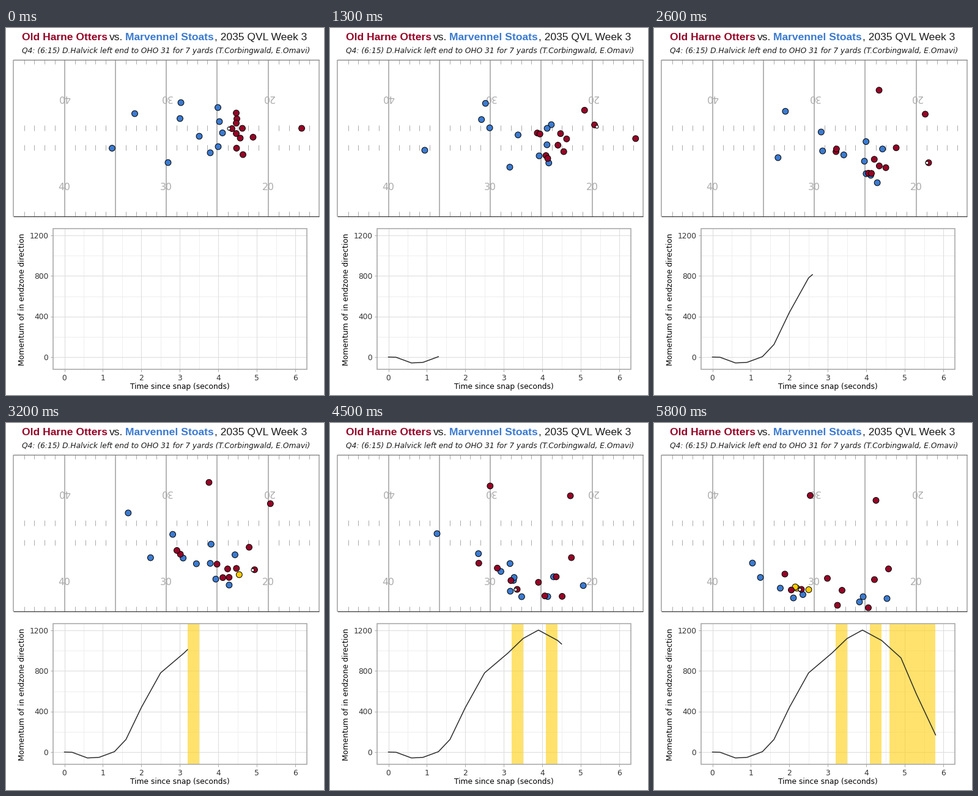
Write a matplotlib script that moves like this. It is 520x600 px and loops after 6.3 s.

```python
import matplotlib.pyplot as plt
import numpy as np
from matplotlib.animation import FuncAnimation
from matplotlib.patches import Rectangle

W, H, DPI = 520, 600, 100
PX = 72 / DPI  # points per pixel
STEP, FRAMES, LAST = 100, 63, 58
T = np.minimum(np.arange(FRAMES), LAST) / 10

RED, BLUE, GOLD = "#960427", "#3b7bd1", "#ffcc00"
LINE, DARK, INK = "#aaaaaa", "#333333", "#1a1a1a"
SANS, HEAD = "DejaVu Sans", "Liberation Sans"

fig = plt.figure(figsize=(W / DPI, H / DPI), dpi=DPI, facecolor="white")
ax = fig.add_axes([0, 0, 1, 1])
ax.set_xlim(0, W)
ax.set_ylim(H, 0)
ax.axis("off")


def label(x, y, text, size, color="black", ha="center", va="baseline",
          family=SANS, **kw):
    return ax.text(x, y, text, fontsize=size * PX, color=color,
                   ha=ha, va=va, family=family, **kw)


def vlines(xs, y0, y1, color, width):
    ax.vlines(xs, y0, y1, color=color, lw=width * PX, zorder=1)


def hlines(ys, x0, x1, color, width):
    ax.hlines(ys, x0, x1, color=color, lw=width * PX, zorder=1)


# ---- headings ----
x = 26
for text, color, weight, gap in (
    ("Old Harne Otters", RED, "bold", 3),
    ("vs.", INK, "normal", 4),
    ("Marvennel Stoats", BLUE, "bold", 1),
    (", 2035 QVL Week 3", INK, "normal", 0),
):
    part = label(x, 20, text, 17.5, color, ha="left", family=HEAD, weight=weight)
    x = part.get_window_extent().x1 + gap

label(262, 41,
      "Q4: (6:15) D.Halvick left end to OHO 31 for 7 yards (T.Corbingwald, E.Omavi)",
      12.2, INK, style="italic")

# ---- field ----
TOP, BOTTOM, LEFT, RIGHT = 51.5, 307.5, 12, 512
YARD = 16.65
five = 95.5 + 5 * YARD * np.arange(-1, 6)
ticks = (five[:-1, None] + YARD * np.arange(1, 5) + 0.7).ravel()
vlines(five, TOP, BOTTOM, LINE, 1.7)
for y0, y1 in ((TOP, 59), (159, 167.5), (191, 199.5), (300, BOTTOM)):
    vlines(ticks, y0, y1, LINE, 1)
hlines(TOP, LEFT, RIGHT, "#777777", 1.2)
hlines(BOTTOM, LEFT, RIGHT, DARK, 1.2)
for x, number in zip(five[1::2], ("40", "30", "20")):
    label(x, 115, number, 15.7, LINE, va="center", rotation=180)
    label(x, 260.5, number, 15.7, LINE, va="center")

# ---- chart ----
X0, X1, Y0, Y1 = 76.5, 492, 328, 558


def sec(t):
    return 95.5 + 62.92 * np.asarray(t)


def mom(v):
    return 538 - 0.1658 * np.asarray(v)


seconds, levels = np.arange(7), np.arange(0, 1201, 400)
vlines(sec(seconds[:-1] + 0.5), Y0, Y1, "#ededed", 0.9)
hlines(mom(levels[:-1] + 200), X0, X1, "#ededed", 0.9)
vlines(sec(seconds), Y0, Y1, "#dedede", 1.1)
hlines(mom(levels), X0, X1, "#dedede", 1.1)
vlines(sec(seconds), Y1, Y1 + 4, LINE, 1)
hlines(mom(levels), X0 - 4, X0, LINE, 1)
for s in seconds:
    label(sec(s), 575.5, str(s), 12.3, DARK)
for v in levels:
    label(69.5, mom(v) + 4.6, str(v), 12.3, DARK, ha="right")
label(284.5, 590, "Time since snap (seconds)", 12.3)
label(27, 443.5, "Momentum of in endzone direction", 12.4, va="center", rotation=90)
ax.add_patch(Rectangle((X0, Y0), X1 - X0, Y1 - Y0, fill=False,
                       ec="#a9a9a9", lw=1.6 * PX, zorder=5))

BANDS = ((3.2, 3.5), (4.1, 4.4), (4.6, 5.8))
bands = [ax.add_patch(Rectangle((sec(a), Y0), sec(b) - sec(a), Y1 - Y0,
                                fc="#ffd218", alpha=0.63, lw=0, zorder=2))
         for a, b in BANDS]

bends = np.array([(0, 0), (.2, -2), (.6, -58), (.9, -52), (1.3, 4), (1.6, 124),
                  (2, 440), (2.5, 781), (3.1, 974), (3.5, 1120), (3.9, 1203),
                  (4.4, 1100), (4.9, 929), (5.3, 573), (5.8, 169)])
curve_x, curve_y = sec(T), mom(np.interp(T, *bends.T))
curve, = ax.plot([], [], color="#2b2b2b", lw=1.5 * PX, zorder=4)

# ---- players ----
# Everyone gets up to speed from rest over about half a second.
progress = T - 0.5 * (1 - np.exp(-T / 0.5))
progress /= progress[-1]

paths, colors, tacklers = [], [], []


def run(color, *points, tackles=False):
    """Polynomial path through waypoints spaced evenly along the run."""
    at = np.linspace(0, 1, len(points))
    fit = np.polyfit(at, np.array(points), len(points) - 1)
    path = np.column_stack([np.polyval(c, progress) for c in fit.T])
    paths.append(path)
    colors.append(color)
    tacklers.append(tackles)
    return path


# defence: secondary, linebackers, front
run(BLUE, (286, 122), (201, 146), (161, 229))
run(BLUE, (210.5, 140), (273, 181), (174, 252.5))
run(BLUE, (173.5, 196.5), (185, 208), (272.5, 234), (206.5, 270))
run(BLUE, (265, 220), (338, 237), (408, 259), (381, 287), tackles=True)
run(BLUE, (284.5, 148), (268.5, 190), (302, 246), (233.5, 270), tackles=True)
run(BLUE, (316, 177), (309, 196), (305, 261), (228, 286))
run(BLUE, (346.5, 130), (374.5, 214), (342, 284))
run(BLUE, (349, 153), (336.5, 197), (231, 268), tackles=True)
run(BLUE, (354, 171.5), (335, 228.5), (253, 272.5), tackles=True)
run(BLUE, (347, 194), (365, 264), (336, 292.5))
run(BLUE, (334, 204), (347, 229), (328, 276), (243.5, 280.5))

# offence: blockers, then the backs
run(RED, (376.5, 139), (346.5, 229.5), (224.5, 273))
run(RED, (377.5, 148.5), (286, 213.5), (283.5, 254))
run(RED, (376.5, 155.5), (281, 207.5), (214, 247))
run(RED, (369.5, 164.5), (363, 237.5), (307.5, 273.5))
run(RED, (376.5, 172.5), (397.5, 202.5), (383.5, 238.5))
run(RED, (383, 180), (377, 237), (360.5, 256))
run(RED, (377, 196.5), (349, 229), (356, 273), (300, 298))
run(RED, (387.5, 207), (352, 230), (377, 273), (350.5, 302))
run(RED, (404, 178.5), (386, 107), (283, 99), (255.5, 118.5))
passer = run(RED, (386.5, 164), (446, 146), (408, 122), (363, 126.5))
carrier = run(RED, (483.5, 164), (469, 209), (341, 263), (241, 272))

# snap to the passer, then a toss to the carrier
snap = np.clip(T / 0.3, 0, 1)[:, None]
toss = np.clip((T - 1.3) / 0.5, 0, 1)[:, None]
held = passer + (1 - snap) * (-22, 0) + snap * (3, 3)
ball_path = (1 - toss) * held + toss * (carrier + (-3, 0))

# a tackler lights up when close to the carrier during a contact band
REACH = 30
spots = np.array(paths)
near = np.linalg.norm(spots - carrier, axis=2) < REACH
contact = np.any([(T > a - 0.01) & (T < b + 0.01) for a, b in BANDS], axis=0)
lit = near & contact & np.array(tacklers)[:, None]

players = ax.scatter(*spots[:, 0].T, s=(9.8 * PX) ** 2, c=colors,
                     edgecolors="black", linewidths=PX, zorder=6)
ball = ax.scatter(*ball_path[:1].T, s=(5 * PX) ** 2, c="white",
                  edgecolors="black", linewidths=PX, zorder=7)


def draw(i):
    players.set_offsets(spots[:, i])
    players.set_facecolor([GOLD if on else color
                           for on, color in zip(lit[:, i], colors)])
    ball.set_offsets(ball_path[i:i + 1])
    n = min(i, LAST) + 1
    curve.set_data(curve_x[:n], curve_y[:n])
    for patch, (start, _) in zip(bands, BANDS):
        patch.set_visible(T[i] > start - 0.01)
    return players, ball, curve, *bands


anim = FuncAnimation(fig, draw, frames=FRAMES, interval=STEP,
                     repeat=True, repeat_delay=0, blit=False)
plt.show()
```
